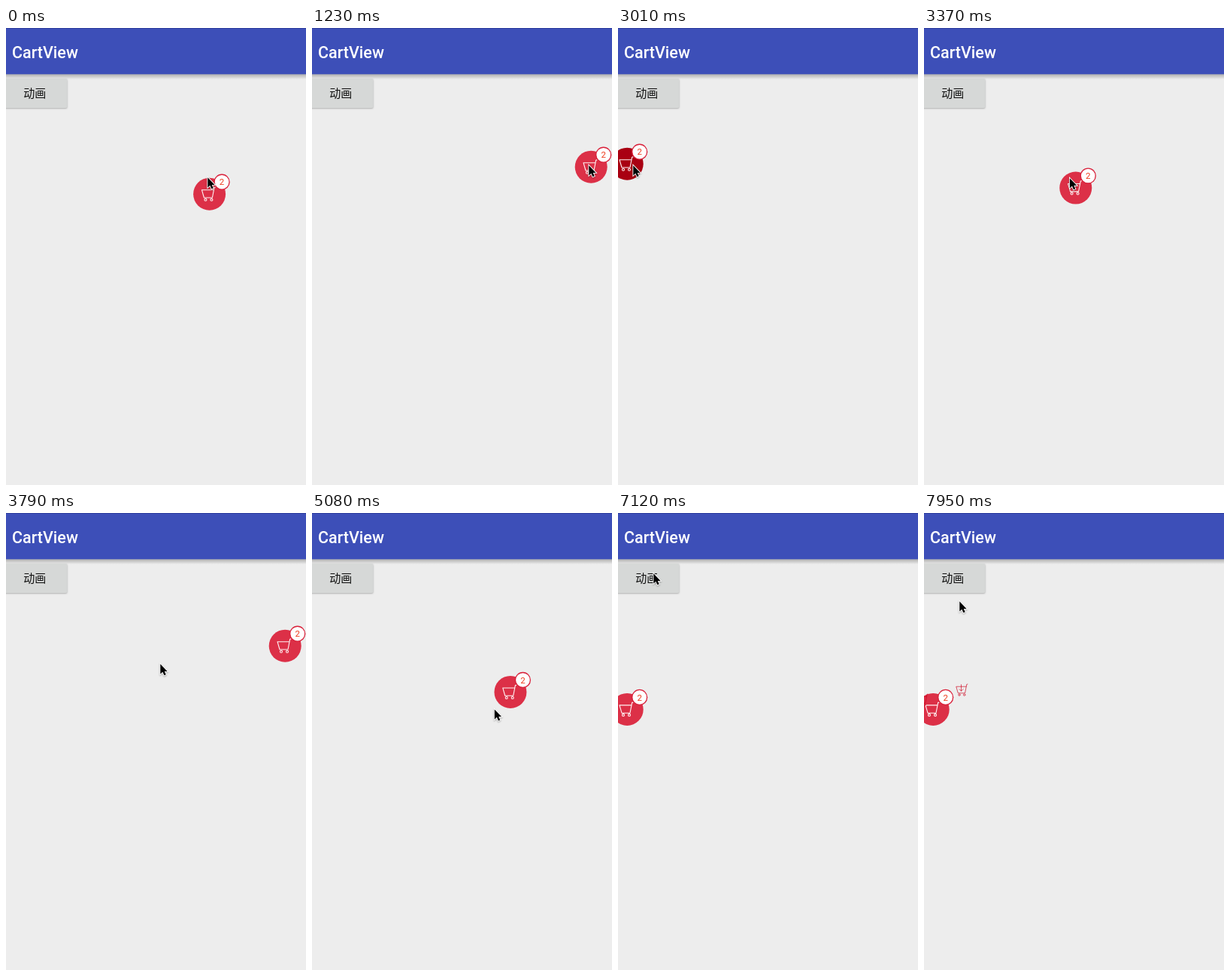
Recreate the animation shown at these times as an HTML page with a canvas. Size 399x606 px, loop 8000 ms.

```html
<!DOCTYPE html>
<html lang="zh">
<head>
<meta charset="utf-8">
<title>CartView</title>
<style>
  html, body { margin: 0; width: 100%; height: 100%; overflow: hidden; background: #ededed; }
  canvas { display: block; width: 399px; height: 606px; }
</style>
</head>
<body>
<canvas id="stage"></canvas>
<script>
const W = 399, H = 606, LOOP = 8000;
const RED = '#dc3047', DARK_RED = '#a90012';
const LEFT = 12.2, RIGHT = 371.2;   // resting places of the cart
const SNAP_RISE = 36, GRAB_DROP = 30;
const PRESS = 100;
const canvas = document.getElementById('stage');
const ctx = canvas.getContext('2d');
const dpr = window.devicePixelRatio || 1;
canvas.width = W * dpr;
canvas.height = H * dpr;

// A journey of glides; between glides the thing stays where it is.
class Path {
  constructor(x, y) {
    this.place = [x, y];
    this.legs = [{ start: 0, end: 0, a: this.place, b: this.place, power: 1 }];
    this.grabs = [];
  }
  to(start, end, x, y, power = 1) {
    this.legs.push({ start, end, a: this.place, b: [x, y], power });
    this.place = [x, y];
    return this;
  }
  snap(t) {
    const [x, y] = this.place;
    return this.to(t, t, x < W / 2 ? LEFT : RIGHT, y - SNAP_RISE);
  }
  grab(t) {
    const [x, y] = this.place;
    this.grabs.push(t);
    return this.to(t, t, x, y + GRAB_DROP);
  }
  at(t) {
    const { start, end, a, b, power } = this.legs.findLast(leg => leg.start <= t);
    const k = t >= end ? 1 : 1 - (1 - (t - start) / (end - start)) ** power;
    return a.map((v, i) => v + (b[i] - v) * k);
  }
  pressed(t) {
    return this.grabs.some(g => t >= g - PRESS && t < g);
  }
}

const pointer = new Path(268, 198)
  .to(60, 220, 254, 199)
  .to(670, 1200, 368, 182)
  .to(1290, 1890, 160, 199)
  .to(2370, 2980, 20, 182)
  .to(3040, 3700, 205, 200, 4)
  .to(4100, 4610, 370, 165)
  .to(4820, 5080, 242.7, 260)
  .to(5080, 5600, 176.5, 294, 2)
  .to(6140, 6240, 192, 284)
  .to(6240, 6880, 47, 80)
  .to(7830, 7950, 47, 117);

const cart = new Path(270.6, 220.2)
  .to(60, 220, 255.5, 220.2).snap(370)
  .grab(1340).to(1340, 1890, 154.5, 216.2).snap(2070)
  .grab(3060).to(3060, 3700, 216, 212.2, 4).snap(3790)
  .grab(4860).to(4860, 5080, 264.2, 237.2).to(5080, 5600, 192, 296.4, 2).snap(5780);

// Small carts thrown along a curve, gaining speed towards the cart.
const throws = [7150, 7252], FLIGHT = 800;
const from = [221, 561], bend = [109.5, 163], goal = [-2, 248];

function disc(x, y, r, fill) {
  ctx.beginPath();
  ctx.arc(x, y, r, 0, Math.PI * 2);
  ctx.fillStyle = fill;
  ctx.fill();
}

function line(...pts) {
  pts.forEach(([x, y], i) => i ? ctx.lineTo(x, y) : ctx.moveTo(x, y));
}

function text(str, x, y, font, color, align = 'left') {
  ctx.font = font;
  ctx.fillStyle = color;
  ctx.textAlign = align;
  ctx.fillText(str, x, y);
}

function shadow(alpha) {
  ctx.shadowColor = `rgba(0,0,0,${alpha})`;
  ctx.shadowBlur = 2 * dpr;
  ctx.shadowOffsetY = dpr;
}

function drawBar() {
  const shade = ctx.createLinearGradient(0, 61, 0, 68);
  shade.addColorStop(0, 'rgba(0,0,0,.27)');
  shade.addColorStop(1, 'rgba(0,0,0,0)');
  ctx.fillStyle = shade;
  ctx.fillRect(0, 61, W, 7);
  ctx.fillStyle = '#3d4fb8';
  ctx.fillRect(0, 0, W, 61.3);
  ctx.fillStyle = '#303f9f';
  ctx.fillRect(0, 0, W, 1);
  text('CartView', 8, 39.5, '500 21.5px Roboto, sans-serif', '#fff');
}

function drawButton() {
  ctx.save();
  shadow(0.25);
  ctx.fillStyle = '#d6d8d7';
  ctx.beginPath();
  ctx.roundRect(-4, 67, 85.5, 39, 2);
  ctx.fill();
  ctx.restore();
  text('动画', 23.2, 92.4, '500 15px "Noto Sans CJK SC", "Noto Sans CJK", sans-serif', '#111');
}

function drawTrolley(x, y, scale, color, width, arrow) {
  ctx.save();
  ctx.translate(x, y);
  ctx.scale(scale, scale);
  ctx.strokeStyle = color;
  ctx.lineWidth = width / scale;
  ctx.lineJoin = ctx.lineCap = 'round';
  ctx.beginPath();
  line([8.5, -9.3], [7.2, -9], [4.5, 4.8], [-6.5, 4.8], [-9.5, -5.5], [6.3, -5.5]);
  if (arrow) {
    line([-1.5, -8.5], [-1.5, 1.5]);
    line([-4.5, -1.5], [-1.5, 1.5], [1.5, -1.5]);
  }
  for (const wheel of [-4.5, 3.5]) {
    ctx.moveTo(wheel + 1.5, 7.5);
    ctx.arc(wheel, 7.5, 1.5, 0, Math.PI * 2);
  }
  ctx.stroke();
  ctx.restore();
}

function drawCart(x, y, pressed) {
  disc(x, y, 21.5, pressed ? DARK_RED : RED);
  drawTrolley(x - 0.7, y, 1, '#fff3f4', 1.1);
  const bx = x + 16.5, by = y - 16;
  disc(bx, by, 10.6, '#d9203a');
  disc(bx, by, 9.3, '#fff');
  text('2', bx, by + 4.2, '11.5px Roboto, sans-serif', '#ee3a1c', 'center');
}

function drawThrow(t) {
  if (t <= 0) return;
  const k = Math.min(t / FLIGHT, 1), u = k * k, v = 1 - u;
  const [x, y] = from.map((s, i) => v * v * s + 2 * u * v * bend[i] + u * u * goal[i]);
  drawTrolley(x, y, 0.84, 'rgba(205,0,28,.75)', 0.9, true);
}

function drawPointer(x, y) {
  ctx.save();
  ctx.translate(x + 0.3, y + 0.3);
  ctx.scale(0.93, 0.93);
  shadow(0.3);
  ctx.beginPath();
  line([0, 0], [0, 14.2], [3.3, 11.2], [5.5, 16.2], [8, 15.1], [5.9, 10.3], [10, 10.3]);
  ctx.closePath();
  ctx.strokeStyle = '#fff';
  ctx.lineWidth = 1.9;
  ctx.stroke();
  ctx.shadowColor = 'transparent';
  ctx.fillStyle = '#000';
  ctx.fill();
  ctx.restore();
}

function draw(t) {
  ctx.setTransform(dpr, 0, 0, dpr, 0, 0);
  ctx.fillStyle = '#ededed';
  ctx.fillRect(0, 0, W, H);
  drawBar();
  drawButton();
  drawCart(...cart.at(t), cart.pressed(t));
  throws.forEach(start => drawThrow(t - start));
  drawPointer(...pointer.at(t));
}

const begun = performance.now();
function tick() {
  draw((performance.now() - begun) % LOOP);
  requestAnimationFrame(tick);
}
tick();
</script>
</body>
</html>
```
